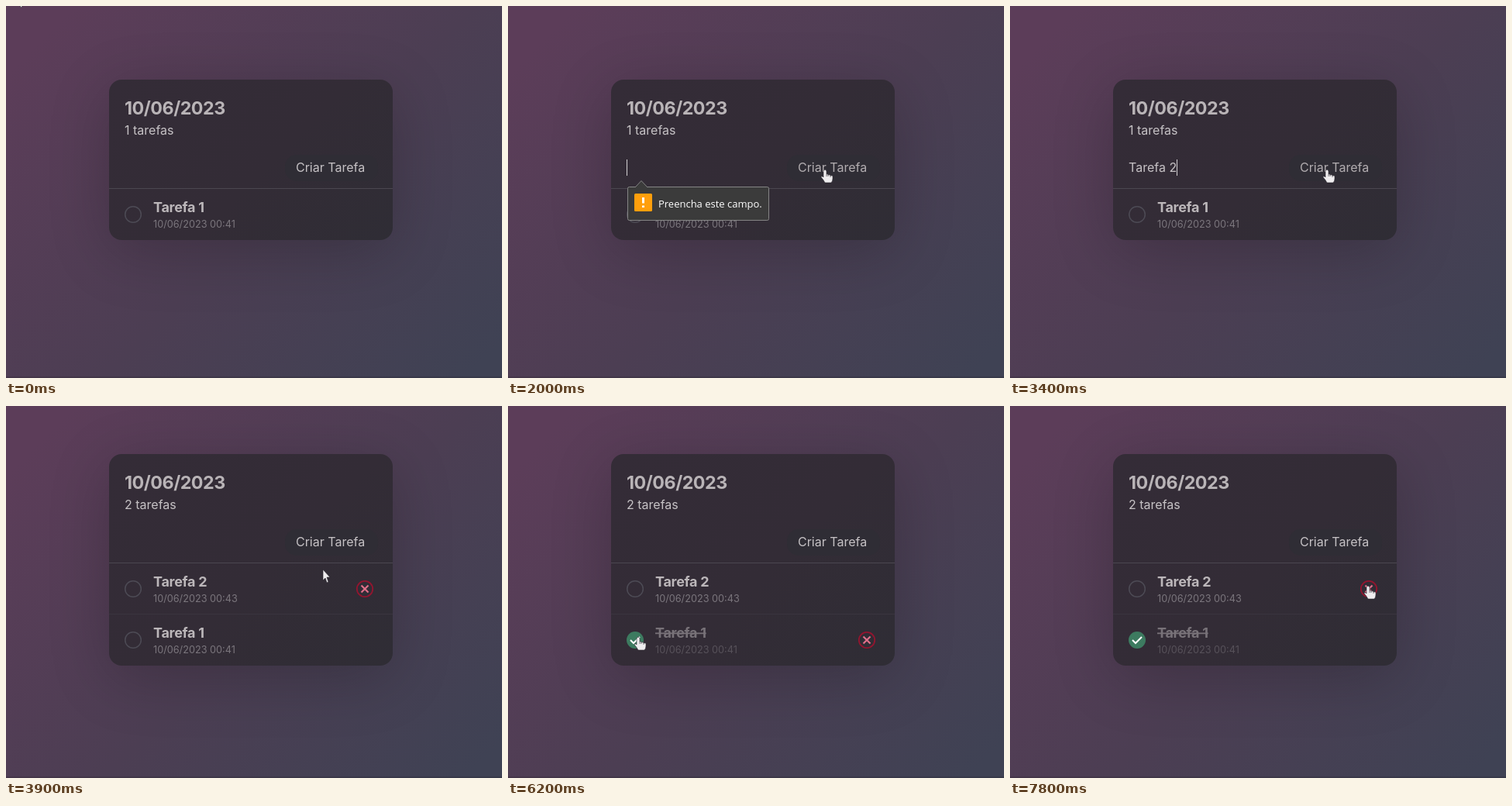
These frames come from a looping animation (640 px wide and 480 px high, 8 s). An HTML page:

```html
<!DOCTYPE html>
<html lang="pt">
<head>
<meta charset="utf-8">
<title>Lista de tarefas</title>
<style>
  html, body { margin: 0; width: 100%; height: 100%; overflow: hidden; }
  body { position: relative; background: linear-gradient(135deg, #5c3d59 8%, #4c3e53 54%, #3f4254 96%); }
  body::after { content: ""; position: absolute; left: 0; right: 0; bottom: 0; height: 2px; background: #0002; }
  #panel {
    position: absolute; left: 133px; width: 366px; border-radius: 16px;
    background: linear-gradient(135deg, #342c37, #332c36 55%, #2f2d35);
    box-shadow: 0 16px 80px #0003;
  }
  svg { position: absolute; left: 0; top: 0; }
  text { font: 16px Inter, sans-serif; fill: #c6c2c5; white-space: pre; }
  .heading { font-size: 23.3px; font-weight: 700; letter-spacing: -.5px; fill: #b9b4b7; }
  .title { font-size: 18px; font-weight: 700; letter-spacing: -.3px; fill: #bcb7ba; }
  .stamp { font-size: 12.7px; fill: #7b767d; }
  .tip { font: 13px "Open Sans", sans-serif; fill: #fff; }
  .ring { fill: none; stroke: #4d4b55; stroke-width: 1.5; }
  .done text { opacity: .5; }
  .done .title { text-decoration: line-through; }
  .check, .done .ring { display: none; }
  .done .check { display: inline; }
</style>
</head>
<body>
<div id="panel"></div>
<svg width="640" height="480">
  <g id="card">
    <text class="heading" x="20" y="45">10/06/2023</text>
    <text id="count" x="20" y="71"></text>
    <text id="field" x="20" y="119"></text>
    <path id="caret" d="M0 103v21" stroke="#d5d2d4"/>
    <rect x="227" y="97" width="120" height="34" rx="15" fill="#2f2d35"/>
    <text id="button" x="241" y="119">Criar Tarefa</text>
    <path d="M0 140.5h366" stroke="#4b4750"/>
    <path id="separator" d="M0 206.5h366" stroke="#3a353f"/>
    <g id="rows"></g>
  </g>
  <g id="bubble">
    <rect x="154.5" y="233.5" width="182" height="43" rx="2" fill="#3b3b3b" stroke="#858585"/>
    <path d="M164 234l8-8.500 8 8.500" fill="#3b3b3b" stroke="#858585"/>
    <rect x="163" y="242" width="23" height="23" rx="1.5" fill="#ff9f0c"/>
    <path d="M174.500 247v7.500m0 3v2.500" stroke="#fff" stroke-width="3"/>
    <text class="tip" x="194" y="260">Preencha este campo.</text>
  </g>
  <g id="cursor" fill="#efedef" stroke="#25222a" stroke-width=".6" stroke-linejoin="round">
    <path id="arrow" d="M0 0v14l3-3 2 6 2-1-2-6h4z"/>
    <path id="hand" d="M-2 2q2-4 4 0v4q2-1 2 1 3-1 3 1 3-1 3 1v3q0 3-2 5h-8q-2-4-5-7 0-2 2-1l1 1zM2 6v3m2-2v2m3-1v2"/>
  </g>
</svg>
<script>
const LOOP = 8000, STEP = 100, CLICK = 1600, TYPE = 2400, ADD = 3900, CHECK = 6000;
const ROW = 66, ROWS_TOP = 141, CHECK_X = 164, REMOVE_X = 463, TASK = "Tarefa 2";

// The pointer follows a curve bent towards "via" on each move
const start = [14, -15];
const moves = [
  { from: 100, until: 1000, via: [518, 264], to: [409, 211] },
  { from: 4800, until: 5600, via: [54, 330], to: [168, 298] },
  { from: 6300, until: 7200, via: [587, 233], to: [462, 232] }
];

const el = id => document.getElementById(id);
const show = (node, on) => node.style.display = on ? "inline" : "none";
const shift = (node, x, y) => node.setAttribute("transform", `translate(${x} ${y})`);
const clamp = v => Math.max(0, Math.min(1, v));
const easeOut = k => 1 - (1 - k) ** 1.7;

function pointerAt(t) {
  return moves.reduce((p, { from, until, via, to }) => {
    const k = easeOut(clamp((t - from) / (until - from)));
    return p.map((a, i) => Math.round((1 - k) ** 2 * a + 2 * k * (1 - k) * via[i] + k * k * to[i]));
  }, start);
}

function addRow(title, stamp) {
  el("rows").insertAdjacentHTML("beforeend", `<g>
    <circle class="ring" cx="31" cy="33" r="10.3"/>
    <g class="check" fill="none">
      <circle cx="31" cy="33" r="11" fill="#3d7b60"/>
      <path d="M25 33l4 4 8-8" stroke="#fff" stroke-width="2"/>
    </g>
    <text class="title" x="57" y="30">${title}</text>
    <text class="stamp" x="57" y="50">${stamp}</text>
    <g class="remove" fill="none">
      <circle cx="330" cy="33" r="10.2" stroke="#94152f" stroke-width="1.8"/>
      <path d="M325.500 28.500l9 9m0-9l-9 9" stroke="#e0708a" stroke-width="2.2"/>
    </g></g>`);
  return el("rows").lastElementChild;
}
const first = addRow("Tarefa 1", "10/06/2023 00:41");
const second = addRow(TASK, "10/06/2023 00:43");

// Places a row and tells whether the pointer is on one of its round buttons
function placeRow(row, index, top, [px, py]) {
  const y = ROWS_TOP + index * ROW, dy = py - top - y;
  shift(row, 0, y);
  show(row.querySelector(".remove"), px > 133 && px < 499 && dy >= 0 && dy < ROW);
  return [CHECK_X, REMOVE_X].some(x => Math.hypot(px - x, dy - ROW / 2) < 11);
}

function draw(t) {
  const added = t >= ADD, count = added ? 2 : 1, top = 128 - count * ROW / 2;
  const pointer = pointerAt(t), [px, py] = pointer;

  el("panel").style.top = top + "px";
  el("panel").style.height = ROWS_TOP + count * ROW - .5 + "px";
  shift(el("card"), 133, top);
  el("count").textContent = `${count} tarefas`;
  show(el("separator"), added);
  show(second, added);
  first.classList.toggle("done", t >= CHECK);
  const overFirst = placeRow(first, count - 1, top, pointer);
  const overSecond = placeRow(second, 0, top, pointer);

  const active = t >= CLICK && !added;
  const typed = 2 * Math.max(0, Math.floor((t - TYPE) / 200));
  el("field").textContent = active ? TASK.slice(0, typed) : "";
  shift(el("caret"), Math.round(20 + el("field").getComputedTextLength()) + .5, 0);
  show(el("caret"), active);
  el("button").style.fill = active ? "#b2adb0" : "";

  const shown = easeOut(clamp((t - CLICK + 100) / 300)), hidden = clamp((t - 2050) / 500);
  el("bubble").style.opacity = shown * (1 - hidden);
  shift(el("bubble"), 0, 4 * (1 - shown) + 8 * hidden);

  const overButton = px > 360 && px < 480 && py > top + 97 && py < top + 131;
  const hand = overButton || (added && (overFirst || overSecond));
  show(el("hand"), hand);
  show(el("arrow"), !hand);
  shift(el("cursor"), px, py);
}

function tick() {
  const t = performance.now() % LOOP;
  draw(Math.floor(t / STEP) * STEP);
  requestAnimationFrame(tick);
}
tick();
</script>
</body>
</html>
```
